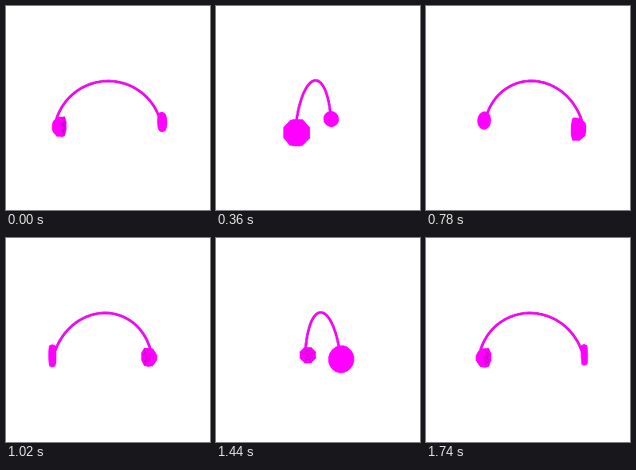
Recreate the animation shown at these times as an HTML page with a canvas. Size 256x256 px, loop 1800 ms.

```html
<!DOCTYPE html>
<html lang="en">
<head>
<meta charset="utf-8">
<title>Turning headphones</title>
<style>
  html, body { margin: 0; width: 100%; height: 100%; overflow: hidden; background: #fff; }
  canvas { display: block; width: 100vw; height: 100vh; }
</style>
</head>
<body>
<canvas id="stage" width="256" height="256"></canvas>
<script>
const ctx = document.getElementById('stage').getContext('2d');
const LOOP = 1800, STEP = 60, TAU = Math.PI * 2;
const PINK = '#f0f', DARK = '#a000a0';
const CX = 128.2, CY = 129, DEPTH = 225;

// Rings are [offset along the outward axis, radius].
const cups = [
  { side: -1, dist: 62.5, drop: 22.5, lag: -2 * TAU / 360, sides: 8,
    rings: [[-6, 13], [1, 12.4], [6, 7.5]], lined: true },
  { side: 1, dist: 67.5, drop: 16.5, lag: 0, sides: 20,
    rings: [[-2.5, 11.4], [0, 12.1], [2.5, 11.2]], lined: false }
];
const band = { radius: 68, drop: 33.2, from: 0.2, to: Math.PI - 0.28 };

// Turns a point about the upright axis and projects it.
function project(x, y, z, turn) {
  const c = Math.cos(turn), s = Math.sin(turn);
  const scale = DEPTH / (DEPTH - (z * c - x * s));
  return [CX + (x * c + z * s) * scale, CY + y * scale];
}

function trace(points, closed) {
  ctx.beginPath();
  points.forEach(p => ctx.lineTo(p[0], p[1]));
  if (closed) ctx.closePath();
}

function fillShape(points) {
  trace(points, true);
  ctx.fill();
  ctx.stroke();
}

function drawBand(turn) {
  const points = [];
  for (let i = 0; i <= 60; i++) {
    const a = band.from + (band.to - band.from) * i / 60;
    points.push(project(-band.radius * Math.cos(a), band.drop - band.radius * Math.sin(a), 0, turn));
  }
  trace(points, false);
  for (const [color, width] of [[DARK, 3.2], [PINK, 2.6]]) {
    ctx.strokeStyle = color;
    ctx.lineWidth = width;
    ctx.stroke();
  }
}

function drawCup(cup, turn) {
  const angle = turn + cup.lag, n = cup.sides;
  const ring = (offset, r) => Array.from({ length: n }, (_, i) => {
    const a = (i + 0.5) / n * TAU;
    return project(cup.side * (cup.dist + offset), cup.drop + r * Math.cos(a), r * Math.sin(a), angle);
  });
  const rings = cup.rings.map(([offset, r]) => ring(offset, r));

  ctx.fillStyle = ctx.strokeStyle = PINK;
  ctx.lineWidth = 0.5;
  rings.forEach(fillShape);
  for (let k = 1; k < rings.length; k++) {
    for (let i = 0; i < n; i++) {
      const j = (i + 1) % n;
      fillShape([rings[k - 1][i], rings[k - 1][j], rings[k][j], rings[k][i]]);
    }
  }

  const innerSeen = cup.side * Math.sin(angle) * DEPTH + cup.dist > 0;
  if (cup.lined && innerSeen) {
    const [offset, r] = cup.rings[0];
    const hub = project(cup.side * (cup.dist + offset), cup.drop, 0, angle);
    ctx.strokeStyle = 'rgba(90, 0, 90, 0.35)';
    ctx.lineWidth = 0.6;
    trace(ring(offset, r * 0.55), true);
    ctx.stroke();
    rings[0].forEach(p => { trace([hub, p], false); ctx.stroke(); });
  }
}

function draw(time) {
  const turn = Math.floor(time % LOOP / STEP) * STEP / LOOP * TAU;
  ctx.fillStyle = '#fff';
  ctx.fillRect(0, 0, 256, 256);
  ctx.lineJoin = 'round';
  drawBand(turn);
  cups.forEach(cup => drawCup(cup, turn));
}

const start = performance.now();
function tick() {
  draw(performance.now() - start);
  requestAnimationFrame(tick);
}
tick();
</script>
</body>
</html>
```
